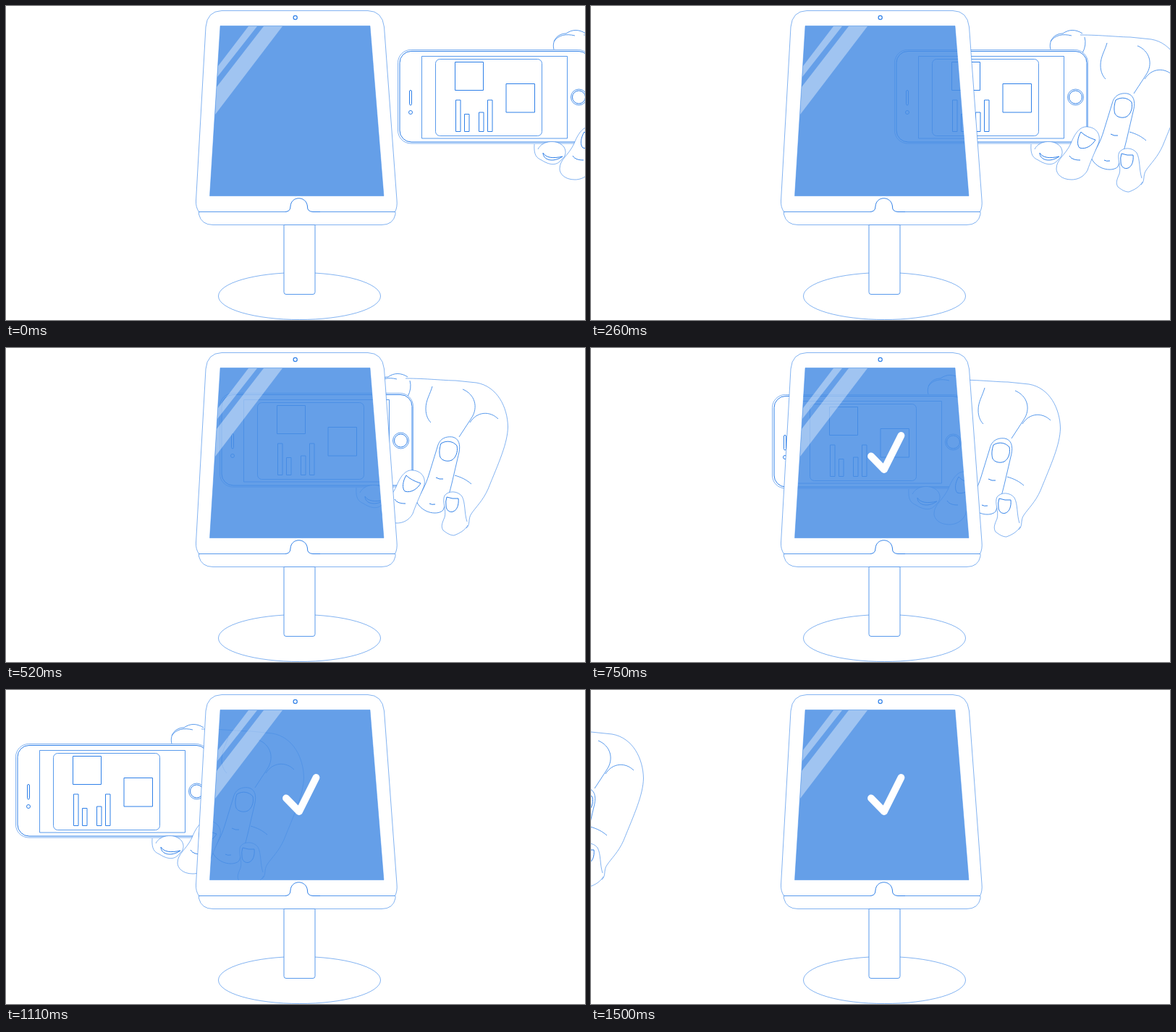
An HTML page with a canvas that plays this animation: 800 px wide and 434 px high, repeating every 1630 ms.

```html
<!DOCTYPE html>
<html lang="en">
<head>
<meta charset="utf-8">
<title>Tap to check in</title>
<style>
html, body { margin: 0; width: 100%; height: 100%; overflow: hidden; background: #fff; }
canvas { display: block; width: 100vw; height: 100vh; }
</style>
</head>
<body>
<canvas id="stage" width="800" height="434"></canvas>
<script>
const ctx = document.getElementById('stage').getContext('2d');
const LOOP = 1630;
const CHECK_AT = 750;
const LINE = '#2f80e8';
const FINE = 0.6;
const MEDIUM = 0.8;

// Stepped motion of the hand: start time, x, y
const poses = [
  [0, 122, 0], [130, 61, 0], [260, 0, 0], [390, -62, 1], [520, -124, 2], [650, -169, 4],
  [980, -300, 14], [1110, -406, 14], [1240, -511, 14], [1370, -628, 14], [1500, -745, 15]
];

const shapes = {
  topFinger: new Path2D('M635 60C632 49 639 38 652 38C660 32 670 32 679 38M635 49C641 40 652 38 664 41M682 43Q685 54 679 65'),
  palm: new Path2D('M676 40C705 40 730 43 745 43L774 46C803 51 817 80 817.5 107C817 130 805 156 790 193C783 209 773 218 767 227C762 234 766 242 760 247'),
  creases: new Path2D('M713 51C710 62 704 70 704 82C704 92 708 98 711 101M755 55C772 62 777 80 767 95L750 121M765 101C775 85 793 85 804 96M744 174C754 177 760 180 767 186'),
  pinkyTip: new Path2D('M608 191C607 206 611 210 618 213C632 222 640 219 645 213C651 208 653 202 649 195C641 184 619 185 613 198'),
  pinkyNail: new Path2D('M620 203C624 210 634 211 647 208M620 203C620 213 634 217 647 208'),
  long: new Path2D('M691 210C699 196 704 187 708 174L720 135C723 122 733 120 741 121C750 123 752 132 750 142L740 185C737 199 732 211 728 222C722 229 700 228 691 210Z'),
  longMarks: new Path2D('M725 130C733 125 742 127 747 133C749 142 745 150 740 153C733 156 726 153 724 149C722 143 723 136 725 130M718 177Q723 180 728 179M709 213Q712 215 717 214'),
  index: new Path2D('M643 225C643 212 655 207 663 190C670 172 678 166 686 167C700 168 705 180 701 190C695 205 690 215 686 227C680 238 670 240 664 240C650 240 643 232 643 225Z'),
  indexMarks: new Path2D('M677 174C672 182 671 192 675 196C684 199 693 192 697 185C688 182 682 179 677 174M661 207C664 212 670 213 676 213'),
  little: new Path2D('M761 238C757 226 759 212 754 203C748 195 735 195 730 202C726 210 733 222 730 232C726 241 725 245 728 250C733 254 738 257 743 257C751 254 758 250 762 243'),
  littleNail: new Path2D('M733 204Q741 207 749 206C750 215 747 222 742 224C737 226 732 222 732 216Q731 210 733 204'),
  body: new Path2D('M298 6.5H500Q520 7 522.5 29L540 268Q541 278 537.5 284.5H266.5Q262 278 262.5 269L276 29Q278 7 298 6.5Z'),
  screen: new Path2D('M296 27.5H503L522 262.5H281.5Z'),
  lip: new Path2D('M266.5 284.5V288Q270 302.5 286 302.5H519Q535 302.5 538 288V284.5Z'),
  seam: new Path2D('M266 284.5H386M434 284.5H538'),
  notch: new Path2D('M386 284.5Q393 284 393 277C394 262 415 262 416.5 277Q416 284 424 284.5H434'),
  glare: new Path2D('M335 28H347L292 98L293 83ZM356 28H382L289 150L291 112Z'),
  check: new Path2D('M387 149.5L405 168L428.5 121')
};

function stroke(path, width = 1) {
  ctx.strokeStyle = LINE;
  ctx.lineWidth = width;
  ctx.stroke(path);
}

function solid(path, width) {
  ctx.fillStyle = '#fff';
  ctx.fill(path);
  stroke(path, width);
}

function box(x, y, w, h, r = 0) {
  const path = new Path2D();
  path.roundRect(x, y, w, h, r);
  return path;
}

function circle(x, y, r) {
  const path = new Path2D();
  path.arc(x, y, r, 0, Math.PI * 2);
  return path;
}

function drawStand() {
  const foot = new Path2D();
  foot.ellipse(405.5, 401, 112, 32.5, 0, 0, Math.PI * 2);
  stroke(foot, FINE);
  solid(box(384, 302.5, 43, 96, [0, 0, 3, 3]), MEDIUM);
}

function drawPhone() {
  solid(box(419.5, 60.5, 267, 129.5, 18), FINE);
  stroke(box(422, 62.5, 263, 125.5, 16));
  stroke(box(452.5, 69.5, 201, 113.5), MEDIUM);
  stroke(box(471.5, 73.5, 147, 106, 6), MEDIUM);
  stroke(box(498.5, 77.5, 39, 39));
  stroke(box(569, 107.5, 39.5, 39.5));
  for (const [x, top] of [[499.5, 130], [511.5, 149.5], [531.5, 147], [543.5, 130]]) {
    stroke(box(x, top, 6.5, 173.5 - top));
  }
  stroke(box(435.5, 116.5, 3, 20.5, 1.5));
  stroke(circle(437, 147, 2.5));
  stroke(circle(669.5, 126, 11), MEDIUM);
  stroke(circle(669.5, 126, 9));
}

function drawHand(x, y) {
  ctx.save();
  ctx.translate(x, y);
  stroke(shapes.topFinger, MEDIUM);
  stroke(shapes.palm, FINE);
  stroke(shapes.creases, MEDIUM);
  drawPhone();
  solid(shapes.pinkyTip, FINE);
  stroke(shapes.pinkyNail);
  solid(shapes.long, MEDIUM);
  stroke(shapes.longMarks);
  solid(shapes.index, FINE);
  stroke(shapes.indexMarks);
  solid(shapes.little, FINE);
  stroke(shapes.littleNail);
  ctx.restore();
}

function strokeWithin(path, top, height) {
  ctx.save();
  ctx.beginPath();
  ctx.rect(0, top, 800, height);
  ctx.clip();
  stroke(path, FINE);
  ctx.restore();
}

function drawTablet() {
  const bezel = new Path2D(shapes.body);
  bezel.addPath(shapes.screen);
  ctx.fillStyle = '#fff';
  ctx.fill(bezel, 'evenodd');
  ctx.fill(shapes.lip);

  // The tinted glass lets the lines behind it show faintly
  ctx.fillStyle = 'rgba(74, 143, 228, 0.85)';
  ctx.fill(shapes.screen);
  ctx.fillStyle = 'rgba(255, 255, 255, 0.38)';
  ctx.fill(shapes.glare);
  stroke(shapes.screen, 0.4);

  strokeWithin(shapes.body, 0, 284);
  strokeWithin(shapes.lip, 285, 149);
  stroke(shapes.seam, MEDIUM);
  stroke(shapes.notch);
  stroke(circle(399.7, 16, 2.6), 1.2);
}

function drawCheck() {
  ctx.strokeStyle = '#fff';
  ctx.lineWidth = 9.8;
  ctx.lineCap = ctx.lineJoin = 'round';
  ctx.stroke(shapes.check);
  ctx.lineCap = 'butt';
  ctx.lineJoin = 'miter';
}

function draw(time) {
  const [, x, y] = poses.findLast(pose => time >= pose[0]);
  ctx.fillStyle = '#fff';
  ctx.fillRect(0, 0, 800, 434);
  drawStand();
  drawHand(x, y);
  drawTablet();
  if (time >= CHECK_AT) drawCheck();
}

const start = performance.now();

function tick() {
  draw((performance.now() - start) % LOOP);
  requestAnimationFrame(tick);
}

tick();
</script>
</body>
</html>
```
